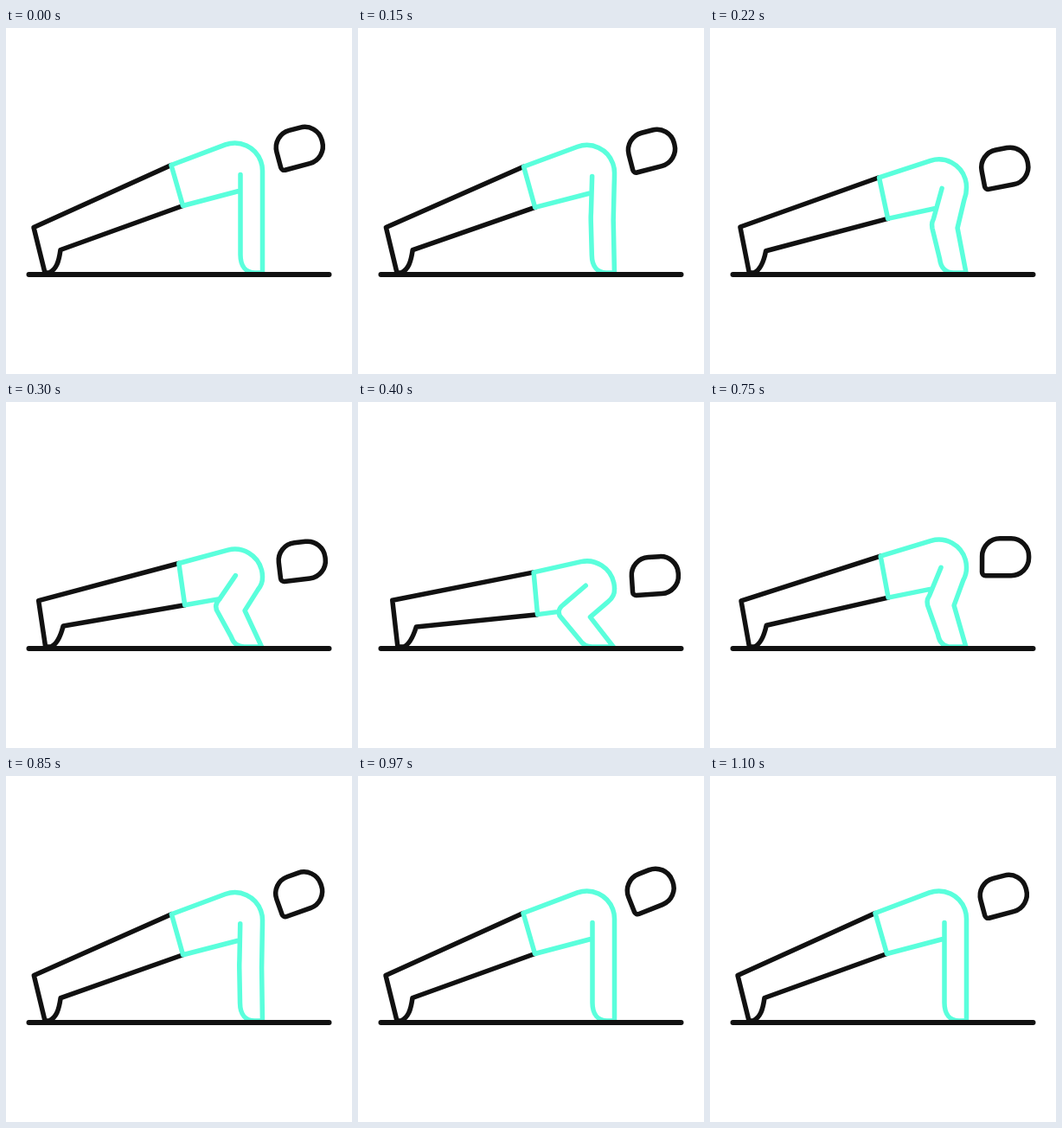
Write an HTML page with a canvas that moves like this. It is 400x400 px and loops after 1120 ms.

```html
<!DOCTYPE html>
<html lang="en">
<head>
<meta charset="utf-8">
<title>Push-up</title>
<style>
  html, body { margin: 0; width: 100%; height: 100%; overflow: hidden; background: #fff; }
  canvas { display: block; width: 400px; height: 400px; }
</style>
</head>
<body>
<canvas id="stage" width="400" height="400"></canvas>
<script>
const ctx = document.getElementById('stage').getContext('2d');
const LOOP = 1120, STEP = 25;
const INK = '#111111', MINT = '#5affdc';
const RAD = Math.PI / 180;

const clamp = x => Math.min(1, Math.max(0, x));
const mix = (a, b, k) => a + (b - a) * k;

// CSS-style cubic-bezier easing, solved by bisection
function bezier(x1, y1, x2, y2) {
  const at = (a, b, s) => 3 * a * s * (1 - s) ** 2 + 3 * b * s * s * (1 - s) + s ** 3;
  return x => {
    if (x <= 0 || x >= 1) return clamp(x);
    let lo = 0, hi = 1;
    for (let i = 0; i < 24; i++) {
      const mid = (lo + hi) / 2;
      if (at(x1, x2, mid) < x) lo = mid; else hi = mid;
    }
    return at(y1, y2, lo);
  };
}
const easeDown = bezier(0.25, 0.1, 0.25, 1);
const easeUp = bezier(0.3, 0, 0.5, 1);

// 0 = arms straight, 1 = lowest position
const depth = t => t < 635 ? easeDown((t - 122) / 488) : 1 - easeUp((t - 635) / 250);

// extra nod of the head while rising: [time, degrees]
const NOD = [[640, 0], [745, 9.5], [900, -9.5], [1100, 0]];
function nod(t) {
  for (let i = 1; i < NOD.length; i++) {
    const [t0, a] = NOD[i - 1], [t1, b] = NOD[i];
    if (t >= t0 && t < t1) return mix(a, b, (1 - Math.cos(Math.PI * (t - t0) / (t1 - t0))) / 2);
  }
  return 0;
}

function stroke(color, width = 5.5) {
  ctx.strokeStyle = color;
  ctx.lineWidth = width;
  ctx.stroke();
}

function drawLegs(pt, hipTop, hipLow) {
  ctx.beginPath();
  ctx.moveTo(...hipTop);
  ctx.lineTo(...pt(32, 230.5, 41, 229));
  ctx.lineTo(...pt(45, 283, 46, 283));
  ctx.lineTo(...pt(50, 283, 53, 283));
  ctx.bezierCurveTo(...pt(58, 279, 59, 281), ...pt(61, 271, 64, 272), ...pt(63, 256.5, 68, 260.5));
  ctx.lineTo(...hipLow);
  stroke(INK);
}

function drawTorso(p, pt, hipTop, hipLow) {
  const armpit = pt(271, 169.5, 262, 219);
  const bend = pt(271, 212, 232, 238);
  const elbow = pt(271, 218, 226, 247);

  // the belly line ends on the inner edge of the arm
  const bellyY = mix(188, 251, p);
  const k = (bellyY - armpit[1]) / (bend[1] - armpit[1]);
  const bellyX = Math.max(elbow[0], mix(armpit[0], bend[0], k));

  ctx.beginPath();
  ctx.moveTo(bellyX, bellyY);
  ctx.lineTo(...hipLow);
  ctx.lineTo(...hipTop);
  ctx.arc(264.5, mix(165, 224, p), 32, (-90 - mix(20, 11, p)) * RAD, 0);
  ctx.quadraticCurveTo(...pt(296.5, 172, 297, 233), ...pt(296.5, 180, 288, 239));
  ctx.lineTo(...pt(296.5, 221, 264, 253));
  ctx.lineTo(...pt(296.5, 283, 295, 283));
  ctx.lineTo(...pt(288, 283, 268, 283));
  ctx.bezierCurveTo(...pt(278, 283, 262, 283), ...pt(271, 276, 258, 281), ...pt(271, 262, 254, 277));
  ctx.lineTo(...pt(271, 222, 227, 251));
  ctx.lineTo(...elbow);
  ctx.quadraticCurveTo(...pt(271, 216, 226, 242), ...bend);
  ctx.lineTo(...armpit);
  stroke(MINT);
}

function drawHead(p, pt, extra) {
  const [x, y] = pt(339.3, 137.5, 344, 210.5);
  ctx.save();
  ctx.translate(x - 57, y + 6);
  ctx.rotate(extra * RAD);
  ctx.translate(57, -6);
  ctx.rotate(mix(-15, -2, p) * RAD);
  ctx.beginPath();
  ctx.roundRect(-27, -21.5, 54, 43, [20.5, 20.5, 20.5, 4]);
  stroke(INK);
  ctx.restore();
}

function drawGround() {
  ctx.beginPath();
  ctx.moveTo(26.5, 285);
  ctx.lineTo(373.5, 285);
  stroke(INK, 6);
}

function draw(t) {
  const p = depth(t);
  const pt = (x0, y0, x1, y1) => [mix(x0, x1, p), mix(y0, y1, p)];
  const hipTop = pt(191, 158.5, 205, 203);
  const hipLow = pt(204.5, 205.5, 208, 252);

  ctx.fillStyle = '#fff';
  ctx.fillRect(0, 0, 400, 400);
  ctx.lineCap = ctx.lineJoin = 'round';
  drawLegs(pt, hipTop, hipLow);
  drawTorso(p, pt, hipTop, hipLow);
  drawHead(p, pt, nod(t));
  drawGround();
}

const start = performance.now();
function tick() {
  const t = (performance.now() - start) % LOOP;
  // 40 poses a second, switched on 10 ms ticks
  draw(Math.floor((Math.floor(t / 10) * 10 + 5) / STEP) * STEP);
  requestAnimationFrame(tick);
}
tick();
</script>
</body>
</html>
```
